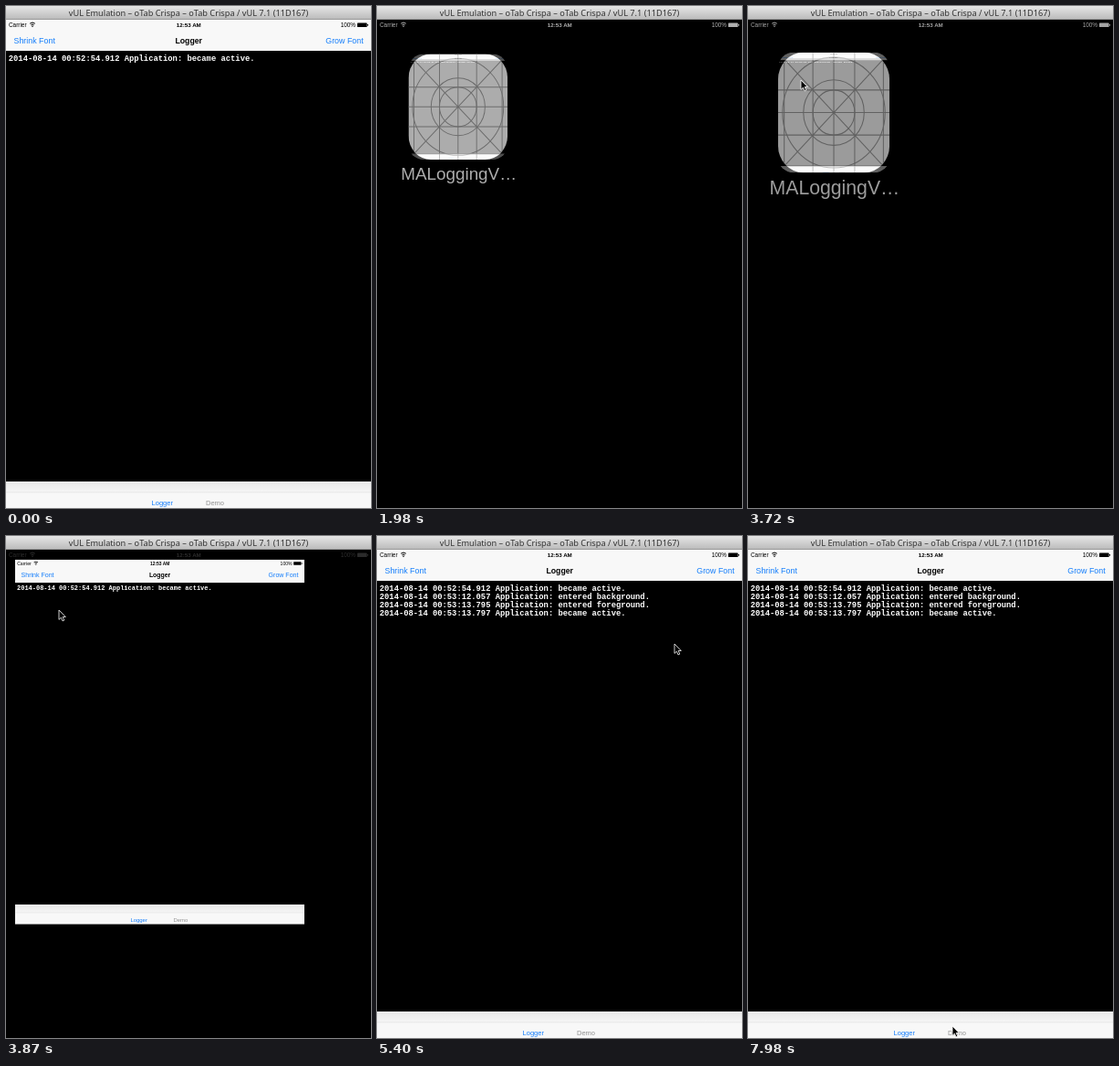
Write an HTML page that moves like this. It is 400x549 px and loops after 8000 ms.

```html
<!DOCTYPE html>
<html lang="en">
<head>
<meta charset="utf-8">
<title>Logger demo</title>
<style>
  html, body { margin: 0; width: 100%; height: 100%; overflow: hidden; background: #000; }
  svg { display: block; width: 400px; height: 549px; }
  text { font-family: "Liberation Sans", Arial, sans-serif; white-space: pre; }
  .title { font: 9.2px "Noto Sans", sans-serif; fill: #333; }
  .log { font: bold 8.82px "Liberation Mono", monospace; fill: #fff; }
  .nav { font-size: 8.9px; fill: #157efb; }
  .head { font-size: 8.7px; font-weight: bold; }
  .tab { font-size: 7.5px; }
  .label { font-size: 6.95px; fill: #fff; }
  .status { font-size: 6.4px; }
  .mid { text-anchor: middle; }
  .end { text-anchor: end; }
</style>
</head>
<body>
<svg viewBox="0 0 400 549">
  <defs>
    <linearGradient id="chrome" x2="0" y2="1">
      <stop offset="0" stop-color="#e6e6e6"/>
      <stop offset="1" stop-color="#b9b9b9"/>
    </linearGradient>
    <linearGradient id="toolbar" x2="0" y2="1">
      <stop offset="0" stop-color="#e9e9e9"/>
      <stop offset="1" stop-color="#f6f6f6"/>
    </linearGradient>
    <clipPath id="round"><rect id="mask" width="400" height="534"/></clipPath>
    <clipPath id="tile"><rect x="-20" y="-20" width="40" height="40" rx="9"/></clipPath>
    <g id="bar" class="status">
      <text x="3" y="7.9">Carrier</text>
      <path d="M26.2 4.2Q29 1.9 31.8 4.2M27.4 5.8Q29 4.4 30.6 5.8" fill="none" stroke="currentColor"/>
      <circle cx="29" cy="7.3" r=".8"/>
      <text class="mid" x="200.3" y="7.9" font-weight="bold" font-size="6.2">12:53 AM</text>
      <text class="end" x="383" y="7.9">100%</text>
      <rect x="385" y="3.6" width="10.6" height="4.4" rx=".6"/>
      <rect x="396" y="5" width="1" height="1.6"/>
    </g>
  </defs>

  <rect width="400" height="549"/>
  <use id="homeBar" href="#bar" y="15" fill="#fff" color="#fff"/>

  <g id="home">
    <text class="label mid" x="63" y="110.7">MALoggingV…</text>
    <circle cx="196" cy="480.3" r="1.8" fill="#777"/>
    <circle cx="204.3" cy="480.3" r="1.9" fill="#fff"/>
    <rect y="485" width="400" height="64" fill="#4b4b4b"/>
    <circle cx="154.3" cy="515" r="18.5" fill="#1c93f3"/>
    <rect x="226" y="495" width="40" height="40" rx="9" fill="#fff"/>
    <text class="label mid" x="154" y="544.6">Trovik</text>
    <text class="label mid" x="246" y="544.6">Prints</text>
  </g>

  <g id="icon"><g clip-path="url(#tile)">
    <rect x="-20" y="-20" width="40" height="40" fill="#fff"/>
    <g fill="none" stroke="#a0a0a0" stroke-width=".35">
      <circle r="18.4"/><circle r="10.9"/><circle r="7.5"/>
      <path d="M-17.8-20V20M-7.5-20V20M0-20V20M7.5-20V20M17.8-20V20
        M-20-17.8H20M-20-7.5H20M-20 0H20M-20 7.5H20M-20 17.8H20
        M-17.8-17.8L17.8 17.8M17.8-17.8L-17.8 17.8"/>
    </g>
    <rect id="press" x="-20" y="-20" width="40" height="40" fill-opacity=".45"/>
  </g></g>

  <g id="app"><g clip-path="url(#round)">
    <rect width="400" height="534"/>
    <rect width="400" height="34" fill="#f8f8f8"/>
    <use href="#bar" color="#000"/>
    <text class="nav" x="8.5" y="25.7">Shrink Font</text>
    <text class="head mid" x="200.2" y="25.7">Logger</text>
    <text class="nav end" x="391.7" y="25.7">Grow Font</text>
    <g id="log"></g>
    <rect y="505" width="400" height="29" fill="#f8f8f8"/>
    <rect y="505" width="400" height="12" fill="url(#toolbar)"/>
    <rect y="516.7" width="400" height=".5" fill="#d4d4d4"/>
    <text class="tab mid" x="171.3" y="531" fill="#157efb">Logger</text>
    <text class="tab mid" x="229" y="531" fill="#929292">Demo</text>
  </g></g>

  <rect width="400" height="15" fill="url(#chrome)"/>
  <rect y="14.5" width="400" height=".5" fill="#777"/>
  <text class="title mid" x="200" y="11.3">vUL Emulation – oTab Crispa – oTab Crispa / vUL 7.1 (11D167)</text>

  <path id="cursor" d="M0 0V10.4L2.4 8.2L4 11.9L5.8 11.1L4.2 7.5H7.3Z" stroke="#fff" stroke-width=".8"/>
</svg>
<script>
const LOOP = 8000, CLOSE = 1740, PRESS = 3500, OPEN = 3650, LIVE = 4170;
const $ = id => document.getElementById(id);
const [homeBar, home, icon, press, app, mask, log, cursor] =
  ['homeBar', 'home', 'icon', 'press', 'app', 'mask', 'log', 'cursor'].map($);

const lines = [
  '00:52:54.912 Application: became active.',
  '00:53:12.057 Application: entered background.',
  '00:53:13.795 Application: entered foreground.',
  '00:53:13.797 Application: became active.'
].map((msg, i) => {
  const row = document.createElementNS('http://www.w3.org/2000/svg', 'text');
  row.setAttribute('class', 'log');
  row.setAttribute('x', 2.8);
  row.setAttribute('y', 45.2 + i * 8.87);
  row.textContent = '2014-08-14 ' + msg;
  return log.appendChild(row);
});

// cursor stops: time, x, y
const stops = [
  [2580, 190, 118], [2940, 120, 87], [3330, 58, 81], [4440, 58, 81],
  [5040, 326, 118], [6900, 326, 118], [7860, 224, 536], [LOOP, 224, 536]
];

const mix = (a, b, k) => a + (b - a) * k;
const show = (el, on) => el.setAttribute('visibility', on ? 'visible' : 'hidden');
const fade = (el, a) => el.setAttribute('opacity', Math.max(0, Math.min(1, a)));
const move = (el, x, y, sx = 1, sy = sx) =>
  el.setAttribute('transform', `translate(${x} ${y}) scale(${sx} ${sy})`);

// critically damped spring falling from 1 to 0
const spring = ms => (1 + 0.0127 * ms) * Math.exp(-0.0127 * ms);

// 0 = home screen, 1 = app fills the screen
function zoomAt(t) {
  if (t < CLOSE) return 1;
  const z = t < OPEN ? spring(t - CLOSE) : 1 - spring(t - OPEN);
  return z < 0.001 ? 0 : z > 0.999 ? 1 : z;
}

// left, top, width and aspect all run from the icon's box to the screen's
function drawZoom(p) {
  const x = mix(42.7, 0, p), y = mix(61.4, 15, p);
  const w = mix(40, 400, p), h = w * mix(1, 534 / 400, p);
  const cx = x + w / 2, cy = y + h / 2;
  const s = w / 40, alpha = Math.min(1, p * 1.7);
  move(icon, cx, cy, s, h / 40);
  fade(icon, alpha < 1 ? 1 : 0);
  move(home, cx - 62.7 * s, cy - 81.4 * s, s);
  fade(home, 1 - alpha);
  fade(homeBar, 1 - p ** 0.7);
  show(app, p > 0);
  move(app, x, y, w / 400, h / 534);
  fade(app, alpha);
  const r = 9 * s * (1 - alpha);
  mask.setAttribute('rx', r * 400 / w);
  mask.setAttribute('ry', r * 534 / h);
}

function drawCursor(t) {
  show(cursor, t >= stops[0][0]);
  const i = stops.findIndex(s => s[0] > t);
  if (i < 1) return;
  const [t0, x0, y0] = stops[i - 1], [t1, x1, y1] = stops[i];
  const k = (t - t0) / (t1 - t0), e = k * k * (3 - 2 * k);
  move(cursor, mix(x0, x1, e), mix(y0, y1, e));
}

function draw(t) {
  drawZoom(zoomAt(t));
  drawCursor(t);
  show(press, t >= PRESS && t < OPEN);
  lines.forEach((row, i) => row.setAttribute('display', i && t < LIVE ? 'none' : 'inline'));
}

const start = performance.now();
function tick() {
  draw((performance.now() - start) % LOOP);
  requestAnimationFrame(tick);
}
tick();
</script>
</body>
</html>
```
